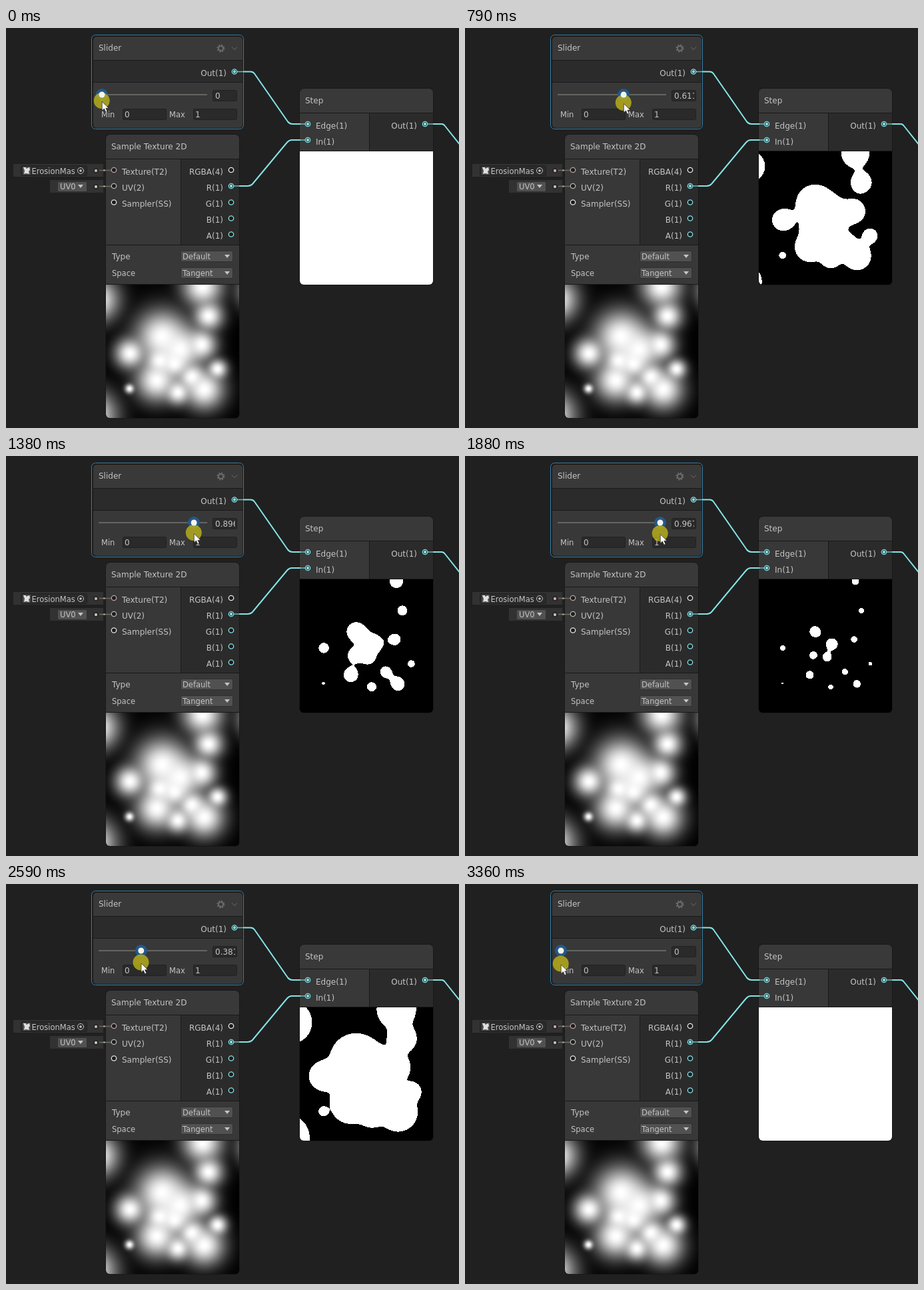
An HTML page with a canvas that plays this animation: 680x600 px, repeating every 3470 ms.

```html
<!DOCTYPE html>
<html lang="en">
<head>
<meta charset="utf-8">
<title>Step node preview</title>
<style>
  html, body { margin: 0; width: 100%; height: 100%; overflow: hidden; background: #202020; }
  svg, canvas { position: absolute; display: block; }
  svg { left: 0; top: 0; }
  canvas { border-radius: 0 0 6px 6px; }
  #mask { left: 150px; top: 385px; }
  #step { left: 441px; top: 185px; }
  text { font: 12px "DejaVu Sans", Verdana, sans-serif; fill: #c4c4c4; }
  .small { font-size: 11.5px; }
  .end { text-anchor: end; }
  .head { fill: #393939; }
  .body { fill: #383838; }
  .dark { fill: #2b2b2b; }
  .field { fill: #2a2a2a; stroke: #212121; }
  .drop { fill: #515151; stroke: #303030; }
  .arrow { fill: #c4c4c4; }
  .wire { fill: none; stroke: #84e4e7; stroke-width: 2; stroke-linejoin: round; }
  .icon { fill: none; stroke: #6c6c6c; }
</style>
</head>
<body>
<svg width="680" height="600" viewBox="0 0 680 600">
  <defs>
    <clipPath id="valueClip"><rect x="311" y="94" width="33" height="16"/></clipPath>
    <clipPath id="sliderClip"><rect x="131" y="13" width="224" height="137" rx="5"/></clipPath>
    <clipPath id="sampleClip"><rect x="150" y="160" width="200" height="425" rx="6"/></clipPath>
    <clipPath id="stepClip"><rect x="441" y="91" width="200" height="294" rx="6"/></clipPath>
  </defs>

  <rect x="128.500" y="10.500" width="228" height="141" rx="6" fill="#1b1b1b" stroke="#3a80a8"/>
  <g clip-path="url(#sliderClip)">
    <rect class="head" x="131" y="13" width="224" height="35"/>
    <rect class="dark" x="131" y="49" width="224" height="32"/>
    <rect class="body" x="131" y="82" width="224" height="68"/>
  </g>
  <circle class="icon" cx="322.500" cy="30.500" r="3.500" stroke-width="2"/>
  <circle class="icon" cx="322.500" cy="30.500" r="5.200" stroke-width="1.600" stroke-dasharray="2.200 1.880"/>
  <path class="icon" d="M339 28.500l4 4 4-4"/>
  <path d="M139 100H302" stroke="#636561" stroke-width="2"/>
  <rect class="field" x="310.500" y="93.500" width="36" height="16" rx="2"/>
  <rect class="field" x="175.500" y="121.500" width="65" height="16" rx="2"/>
  <rect class="field" x="281.500" y="121.500" width="65" height="16" rx="2"/>

  <rect x="149" y="159" width="202" height="427" rx="7" fill="#191919"/>
  <g clip-path="url(#sampleClip)">
    <rect class="head" x="150" y="160" width="200" height="36"/>
    <rect class="body" x="150" y="197" width="112" height="128"/>
    <rect class="dark" x="263" y="197" width="87" height="128"/>
    <rect class="body" x="150" y="326" width="200" height="58"/>
  </g>
  <rect class="drop" x="262.500" y="334.500" width="78" height="16" rx="2"/>
  <rect class="drop" x="262.500" y="359.500" width="78" height="16" rx="2"/>
  <path class="arrow" d="M328 340h8l-4 5zM328 365h8l-4 5z"/>

  <rect x="440" y="90" width="202" height="296" rx="7" fill="#191919"/>
  <g clip-path="url(#stepClip)">
    <rect class="head" x="441" y="91" width="200" height="36"/>
    <rect class="body" x="441" y="128" width="104" height="56"/>
    <rect class="dark" x="546" y="128" width="95" height="56"/>
  </g>

  <rect x="11" y="204" width="135" height="19" fill="#323232"/>
  <rect class="field" x="22.500" y="206.500" width="99" height="15" rx="2"/>
  <rect x="25" y="208" width="12" height="12" fill="#4c4c4c"/>
  <path d="M26 209h4v2l5-2 1 4-2 2 1 4-5-1-3 1 1-5z" fill="#e0e0e0"/>
  <circle class="icon" cx="112" cy="214" r="4.500" style="stroke:#c4c4c4"/>
  <circle class="arrow" cx="112" cy="214" r="1.800"/>
  <rect x="66" y="228" width="80" height="19" fill="#323232"/>
  <rect class="drop" x="77.500" y="230.500" width="44" height="15" rx="2"/>
  <path class="arrow" d="M108 235h8l-4 5z"/>
  <circle cx="135" cy="214" r="3.500" fill="#1d1d1d"/><circle cx="135" cy="214" r="2.200" fill="#cfa8a8"/>
  <circle cx="135" cy="238" r="3.500" fill="#1d1d1d"/><circle cx="135" cy="238" r="2.200" fill="#bcc6b2"/>
  <path d="M140 213.500H158" stroke="#6d6262" stroke-width="1.500"/>
  <path d="M140 237.500H158" stroke="#687260" stroke-width="1.500"/>
  <path d="M146 213.500h3M146 237.500h3" stroke="#a5a598" stroke-width="2"/>

  <path class="wire" d="M356 65.500H367Q371 65.500 373 68.500L423 140.500Q426 144 430 144H442"/>
  <path class="wire" d="M350 237H363Q367 237 370 234L422 171.500Q425 168 429 168H442"/>
  <path class="wire" d="M641 144H654Q657 144 659 147L682 176"/>
  <path class="wire" d="M347 65.500H356M342 237H350M442 144H449M442 168H449M633 144H641" style="stroke-width:1.500;opacity:.75"/>

  <g id="ports"></g>
  <g id="labels"></g>

  <g clip-path="url(#valueClip)"><text id="value" x="314" y="106"></text></g>
  <circle id="halo" cy="100" r="9" fill="#23588a"/>
  <g id="cursor">
    <circle r="12" fill="#beb419" opacity=".8"/>
    <path d="M.500 1.500V15L3.700 12 6 17.200 8.300 16.200 6.100 11.200H10.300Z" fill="#fff" stroke="#222" stroke-width=".7"/>
  </g>
  <circle id="thumb" cy="100" r="4.500" fill="#f6f5ea"/>
</svg>
<canvas id="mask" width="200" height="200"></canvas>
<canvas id="step" width="200" height="200"></canvas>

<script>
const SIZE = 200, LOOP = 3470;
const SPREAD = .363, BLEND = 1.8;
const $ = id => document.getElementById(id);

// Soft dots of the mask: x, y, radius
const dots = [
  [84, 78, 66], [111, 97, 58], [143.5, 90, 38], [36, 103, 37.5], [81, 114, 33],
  [103, 118, 34], [76.5, 143.5, 53], [129, 138.5, 34], [147.5, 157, 50], [108, 161.5, 31],
  [167.5, 126.5, 25], [154, 47, 36.5], [145, 3, 50], [35.5, 156, 12],
  [-13.5, 22.5, 54], [-20.7, 195.5, 60], [229, 9, 47]
];

// Time, slider value, pointer height
const keys = [
  [0, 0, 109], [350, .279, 112], [550, .44, 112], [790, .6105, 112], [1070, .76, 113],
  [1380, .8963, 115], [1580, .961, 116], [1640, .968, 116], [1870, .968, 116],
  [2180, .7724, 116.5], [2390, .59, 117], [2590, .3826, 117.5], [2940, .136, 118.5],
  [3350, 0, 119.5], [LOOP, 0, 119.5]
];

// Gaussian dots, screened over each other
const field = Float32Array.from({ length: SIZE * SIZE }, (_, i) => {
  const x = i % SIZE + .5, y = Math.floor(i / SIZE) + .5;
  let rest = 1;
  for (const [cx, cy, r] of dots) {
    const d = ((x - cx) ** 2 + (y - cy) ** 2) / (r * r);
    rest *= 1 - Math.exp(-d / SPREAD * BLEND);
  }
  return (1 - rest) ** (1 / BLEND);
});

function painter(id) {
  const ctx = $(id).getContext('2d');
  const image = ctx.createImageData(SIZE, SIZE);
  const pixels = new Uint32Array(image.data.buffer);
  return shade => {
    for (let i = 0; i < pixels.length; i++) pixels[i] = 0xff000000 | shade(field[i]) * 0x010101;
    ctx.putImageData(image, 0, 0);
  };
}

// Monotone cubic through one column of the keys
function slope(i, col) {
  if (i === 0 || i === keys.length - 1) return 0;
  const rate = j => (keys[j + 1][col] - keys[j][col]) / (keys[j + 1][0] - keys[j][0]);
  const a = rate(i - 1), b = rate(i);
  return a * b > 0 ? 2 * a * b / (a + b) : 0;
}

function at(time, col) {
  let i = 0;
  while (i < keys.length - 2 && time >= keys[i + 1][0]) i++;
  const p = keys[i], q = keys[i + 1], span = q[0] - p[0], u = (time - p[0]) / span;
  const start = i === 0 ? (q[col] - p[col]) / span : slope(i, col);
  const h = u * u * (3 - 2 * u);
  return p[col] * (1 - h) + q[col] * h
    + span * u * (1 - u) * ((1 - u) * start - u * slope(i + 1, col));
}

const cyan = '#84e4e7', pale = '#e8e8e8';
const port = (x, y, color, linked) =>
  `<circle cx="${x}" cy="${y}" r="3.700" fill="#1d1d1d" stroke="${color}" stroke-width="1.300"/>` +
  (linked ? `<circle cx="${x}" cy="${y}" r="2.200" fill="${color}"/>` : '');

$('ports').innerHTML = [
  [343, 65.5, cyan, 1], [453, 144, cyan, 1], [453, 168, cyan, 1], [629, 144, cyan, 1],
  [162, 213, '#b9a3a3'], [162, 237, '#b4b8ac'], [162, 261.5, pale],
  [338, 213, pale], [338, 237, cyan, 1], [338, 261.5, cyan], [338, 285.5, cyan], [338, 309.5, cyan]
].map(p => port(...p)).join('');

$('labels').innerHTML = [
  ['Slider', 139, 34], ['Out(1)', 331, 71.5, 'end'], ['Min', 143, 134, 'small'], ['Max', 245, 134, 'small'],
  ['0', 178, 134], ['1', 284, 134],
  ['Sample Texture 2D', 158, 182], ['Texture(T2)', 174, 219.5], ['UV(2)', 174, 243.5], ['Sampler(SS)', 174, 267.5],
  ['RGBA(4)', 326, 219.5, 'end'], ['R(1)', 326, 243.5, 'end'], ['G(1)', 326, 267.5, 'end'],
  ['B(1)', 326, 291.5, 'end'], ['A(1)', 326, 315.5, 'end'],
  ['Type', 159, 347], ['Space', 159, 372, 'small'],
  ['Default', 265, 347, 'small'], ['Tangent', 265, 372, 'small'],
  ['ErosionMas', 38.5, 219, 'small'], ['UV0', 81, 242, 'small'],
  ['Step', 449, 113], ['Edge(1)', 465, 150.5], ['In(1)', 465, 174.5], ['Out(1)', 617, 150.5, 'end']
].map(([s, x, y, c = '']) => `<text x="${x}" y="${y}" class="${c}">${s}</text>`).join('');

painter('mask')(v => Math.round(255 * v));
const paintStep = painter('step');

function draw(now) {
  const time = now % LOOP;
  const edge = time < 20 ? 0 : at(time, 1);
  const x = 144 + 154 * edge;
  $('halo').setAttribute('cx', x);
  $('thumb').setAttribute('cx', x);
  $('cursor').setAttribute('transform', `translate(${x - .3} ${at(time, 2)})`);
  $('value').textContent = edge ? edge.toFixed(5) : '0';
  paintStep(v => v >= edge ? 255 : 0);
}

const begin = performance.now();
function tick() {
  draw(performance.now() - begin);
  requestAnimationFrame(tick);
}
tick();
</script>
</body>
</html>
```
